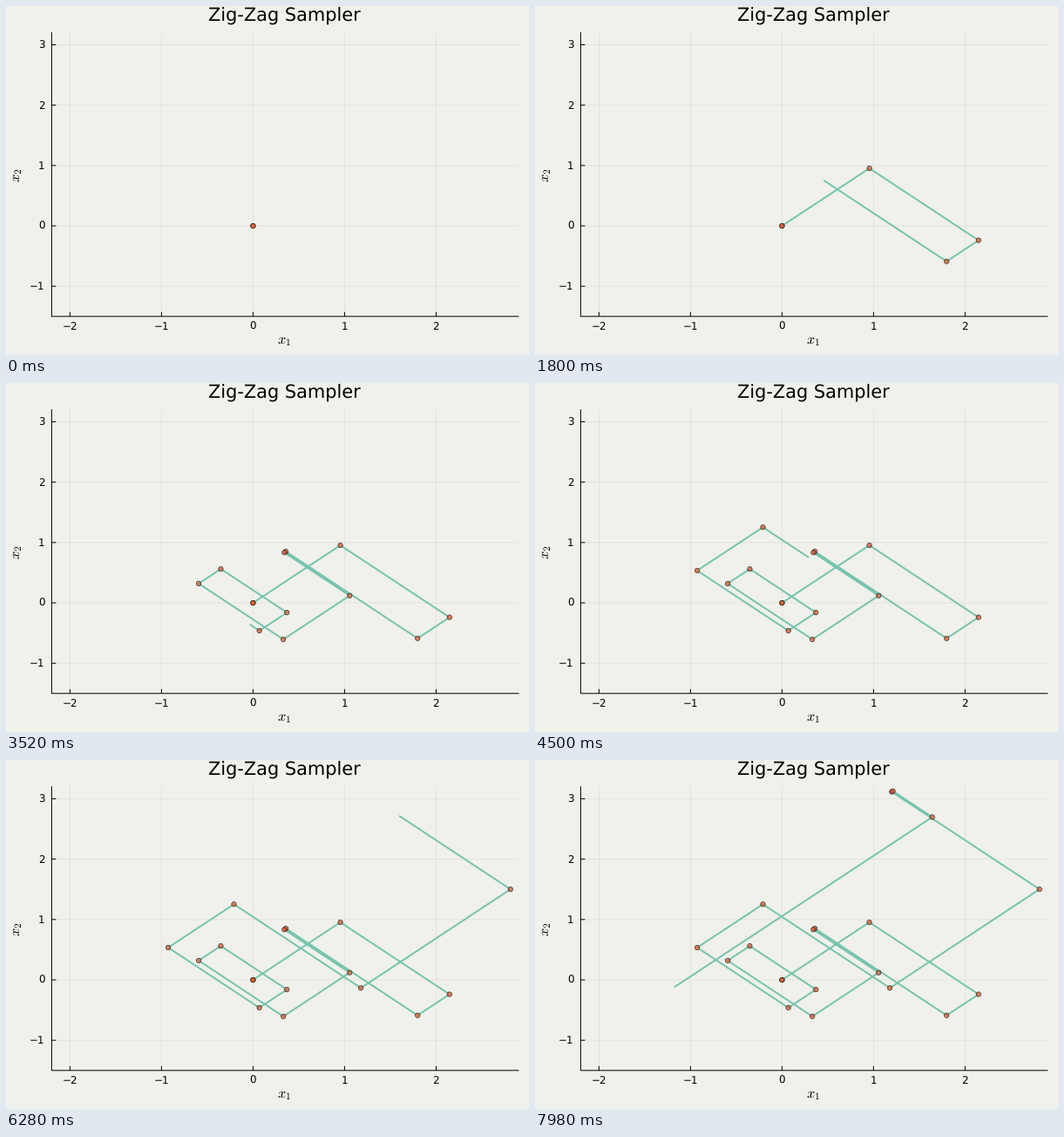
Animation of 600x400 px, one loop 8000 ms. Source, as a matplotlib script:

```python
import numpy as np
import matplotlib.pyplot as plt
from matplotlib.animation import FuncAnimation
from matplotlib.patches import Circle

plt.rcParams.update({"font.family": "DejaVu Sans", "mathtext.fontset": "cm",
                     "text.hinting": "none"})

W, H, DPI = 600, 400, 100
PT = 72 / DPI
BG = "#F0F1EB"
TEAL = "#78C4AE"
ORANGE = "#E0582C"
LEFT, RIGHT, TOP, BOTTOM = 52.4, 587.9, 30.6, 355.8
X_RANGE, Y_RANGE = (-2.2, 2.9), (-1.5, 3.2)


def to_px(x, y):
    return np.interp(x, X_RANGE, (LEFT, RIGHT)), np.interp(y, Y_RANGE, (BOTTOM, TOP))


def walk(flips, times):
    """Corners of a zig-zag path: every event reverses one coordinate."""
    pos, vel = np.zeros(2), np.ones(2)
    corners = [pos]
    for axis, time in zip(flips + " ", times):
        pos = pos + vel * time
        corners.append(pos)
        if axis in "xy":
            vel["xy".index(axis)] *= -1
    return np.array(corners)


times = np.array([0.954, 1.193, 0.349, 1.439, 0.017, 0.714, 0.725, 0.925, 0.242, 0.722,
                  0.301, 0.996, 0.718, 1.387, 1.635, 1.614, 0.012, 0.430, 2.813])
corners = np.column_stack(to_px(*walk("yxyyxxyxyxyxyyxxyx", times).T))
# Every leg is split evenly into steps of about 0.1.
counts = np.maximum(1, np.round(times / 0.1))
arrivals = np.concatenate([[0], np.cumsum(counts)])

fig = plt.figure(figsize=(W / DPI, H / DPI), dpi=DPI, facecolor=BG)
ax = fig.add_axes([0, 0, 1, 1])
ax.set_axis_off()
ax.set_xlim(0, W)
ax.set_ylim(H, 0)


def stroke(xs, ys, color="black", width=1, **style):
    return ax.plot(xs, ys, color=color, linewidth=width * PT, snap=False, **style)[0]


def label(x, y, text, size, ha="center", angle=0):
    ax.text(x, y, text, fontsize=size * PT, ha=ha, va="baseline",
            rotation=angle, rotation_mode="anchor")


def minus(value):
    return str(value).replace("-", "\u2212")


for value in range(-2, 3):
    x, _ = to_px(value, 0)
    stroke([x, x], [TOP, BOTTOM], alpha=0.055)
    stroke([x, x], [BOTTOM, BOTTOM - 5], solid_capstyle="butt")
    label(x, 371, minus(value), 11.9)
for value in range(-1, 4):
    _, y = to_px(0, value)
    stroke([LEFT, RIGHT], [y, y], alpha=0.055)
    stroke([LEFT, LEFT + 5], [y, y], solid_capstyle="butt")
    label(44.6, y + 4, minus(value), 11.9, "right")
stroke([LEFT, LEFT, RIGHT], [TOP, BOTTOM, BOTTOM], solid_joinstyle="miter")

label(319.8, 18, "Zig-Zag Sampler", 20.83)
label(319.4, 386.5, "$x_1$", 16.3)
label(15.5, 194, "$x_2$", 16.3, angle=90)

path = stroke([], [], TEAL, 2, solid_capstyle="round", zorder=3)
# The starting point is marked twice, so it looks denser.
marks = [(0, corners[0])] + list(zip(arrivals, corners[:-1]))
dots = [ax.add_patch(Circle(spot, 2.7, facecolor=ORANGE, edgecolor="black", alpha=0.7,
                            linewidth=0.75 * PT, snap=False, zorder=4))
        for _, spot in marks]


def step_at(frame):
    """Three steps per seven ticks: two quick ones, then a pause."""
    cycle, tick = divmod(frame, 7)
    return 3 * cycle + (tick > 0) + (tick == 6)


def draw(frame):
    step = step_at(frame)
    tip = [np.interp(step, arrivals, side) for side in corners.T]
    trail = np.vstack([corners[arrivals < step], tip])
    path.set_data(trail[:, 0] if step else [], trail[:, 1] if step else [])
    for dot, (arrival, _) in zip(dots, marks):
        dot.set_visible(arrival <= step)
    return [path, *dots]


anim = FuncAnimation(fig, draw, frames=400, interval=20, repeat=True,
                     repeat_delay=0, blit=True)
plt.show()
```
